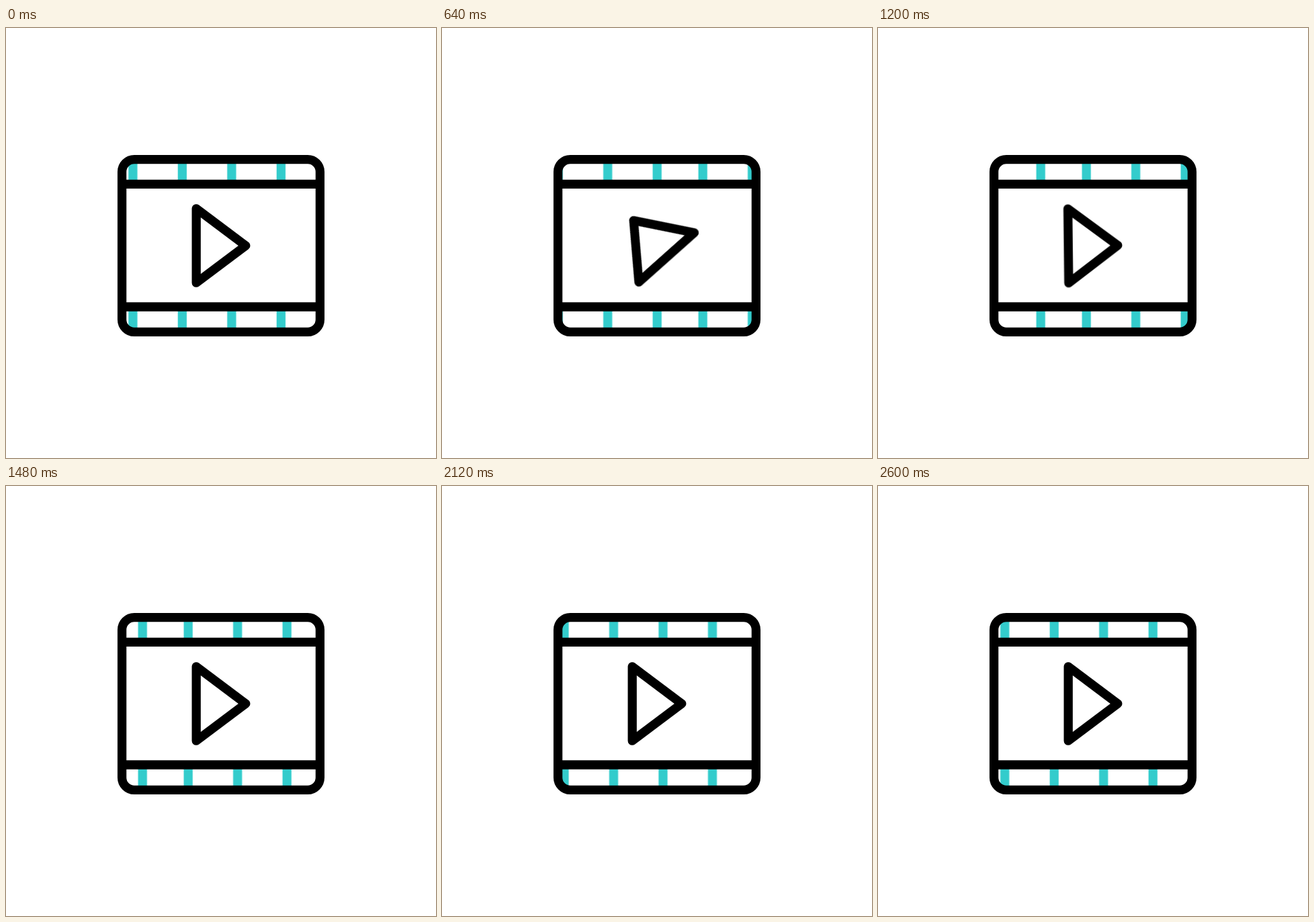
Animation, 640 px wide and 640 px high, one loop 2640 ms. Source, as an HTML page:

```html
<!DOCTYPE html>
<html lang="en">
<head>
<meta charset="utf-8">
<title>Film strip player</title>
<style>
  html, body { margin: 0; width: 100%; height: 100%; overflow: hidden; background: #fff; }
  svg { display: block; width: 100%; height: 100%; }
  path, rect { fill: none; stroke-width: 13.3; }
  .ink { stroke: #000; stroke-linecap: round; stroke-linejoin: round; }
  .strip { stroke: #33cccc; animation: slide 2640ms linear infinite; }
  .play { transform-origin: 312.6px 321.3px; animation: spin 2640ms linear infinite; }

  /* the strip reaches its matching pose at 2600 ms */
  @keyframes slide {
    0% { transform: translateX(0); }
    98.485%, 100% { transform: translateX(-362.3px); }
  }
  /* one full turn in 1250 ms, then rest */
  @keyframes spin {
    0% { transform: rotate(0deg); animation-timing-function: cubic-bezier(.37, 0, .46, 1); }
    47.35%, 100% { transform: rotate(360deg); }
  }
</style>
</head>
<body>
<svg viewBox="0 0 640 640">
  <defs>
    <clipPath id="window"><rect x="172.6" y="195.6" width="294.8" height="256.8" rx="18.4"/></clipPath>
    <path id="bar" d="M189 196V232M189 415V452"/>
    <g id="bars">
      <use href="#bar"/>
      <use href="#bar" x="73.5"/>
      <use href="#bar" x="147"/>
      <use href="#bar" x="220.5"/>
    </g>
  </defs>
  <g clip-path="url(#window)">
    <g class="strip">
      <use href="#bars"/>
      <use href="#bars" x="288.5"/>
      <use href="#bars" x="582.5"/>
    </g>
  </g>
  <g class="ink">
    <rect x="172.6" y="195.6" width="294.8" height="256.8" rx="18.4"/>
    <path d="M172.6 232.3H467.4M172.6 415H467.4"/>
    <path class="play" d="M283.2 268.8V379.2L356.8 324Z"/>
  </g>
</svg>
</body>
</html>
```
